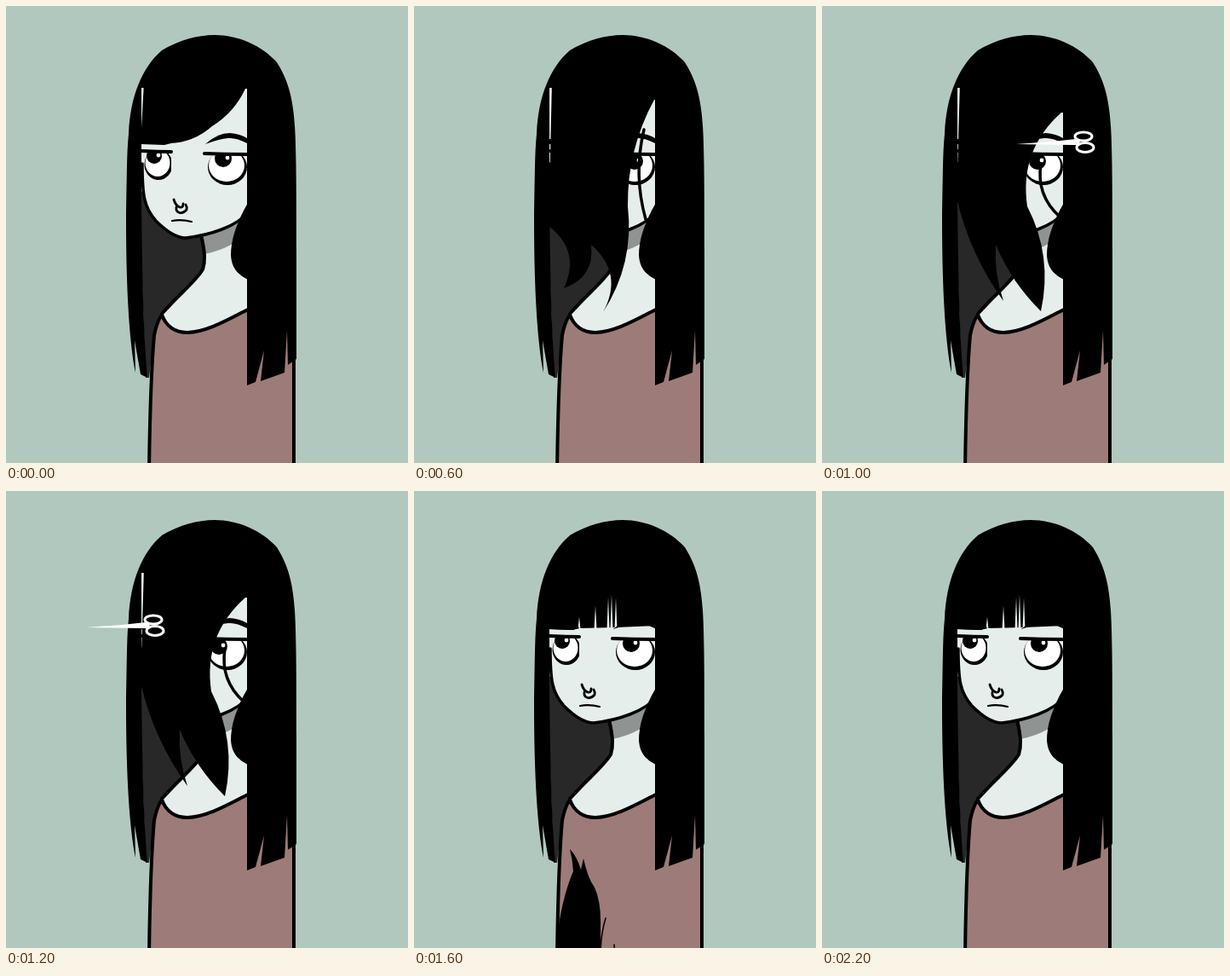
Animation, 472 px wide and 536 px high, one loop 2800 ms. Source, as an HTML page with a canvas:

```html
<!DOCTYPE html>
<html lang="en">
<head>
<meta charset="utf-8">
<title>Cutting bangs</title>
<style>
html, body { margin: 0; width: 100%; height: 100%; overflow: hidden; background: #b1c8be; }
canvas { display: block; width: 472px; height: 536px; }
</style>
</head>
<body>
<canvas id="stage" width="472" height="536"></canvas>
<script>
const ctx = document.getElementById('stage').getContext('2d');
const LOOP = 2800, STEP = 100;
const BG = '#b1c8be', SKIN = '#e6eeec', SHADE = '#8f9392';
const BACK = '#282828', SHIRT = '#9d7b79', INK = '#000', WHITE = '#fff';

const shape = d => new Path2D(d);
function fill(path, color) {
  ctx.fillStyle = color;
  ctx.fill(path);
}
function line(path, width, color = INK) {
  ctx.strokeStyle = color;
  ctx.lineWidth = width;
  ctx.stroke(path);
}
function oval(x, y, rx, ry = rx) {
  const path = new Path2D();
  path.ellipse(x, y, rx, ry, 0, 0, 2 * Math.PI);
  return path;
}

const hair = shape(`M152 430C145 395 141 335 141 250C142 190 142 170 144 150C146 105 160 72 183 52
  C203 40 225 34 245 34C272 34 300 46 318 66C332 88 337 110 339 140C341 170 341 230 341 290
  V414L331 421L330 380L327 430L299 440L303 404L293 441L283 445V96H159V230
  C160 330 162 390 166 436L158 432L151 392Z`);
const sideLock = shape('M284 231C270 255 264 275 264 292C265 310 275 316 284 321Z');
const backHair = shape('M156 215L232 268L236 305L186 362L175 380L168 436H164Z');
const neck = shape('M229 262C234 290 234 300 231 309C222 324 203 338 182 362L195 382H220L290 360V240Z');
const neckLine = shape('M229 268C234 290 234 300 231 309C222 324 203 338 183 361');
const neckShade = shape('M229 270L272 254L266 279Q252 287 233 291Z');
const shirt = shape('M183 362C188 376 199 383 213 383C237 382 262 367 284 356H338V545H168C169 470 171 420 174 386Q177 371 183 362Z');
const face = shape('M159 95V190C160 222 162 236 176 252C188 264 200 272 211 272C238 269 272 259 290 234V95Z');
const jaw = shape('M160 185C160 222 162 236 176 252C188 264 200 272 211 272C238 269 272 259 286 240');
const brows = shape('M234 162Q248 149 263 149Q275 150 283 155V161Q270 154 261 155Q250 156 234 162ZM158 156H191L194 161L186 163L158 162Z');
const nose = shape('M197 227Q199 234 204 236Q208 237 208 232M200 236C199 243 207 245 212 239Q213 236 211 233');
const calm = shape('M195 252Q206 250 218 253');
const frown = shape('M201 256Q206 250 210 256');
const clump = shape(`M183 238Q191 246 196 262L199 249Q204 272 212 283Q220 300 219 330
  C219 355 221 375 226 385C237 400 256 402 257 390L254 378Q266 384 266 400Q266 420 262 432
  C250 448 238 457 226 455C205 452 195 440 187 424C169 400 166 370 168 345C171 310 180 280 187 264Q186 250 183 238Z`);
const looseHairs = shape('M220 378Q217 345 225 319M257 396Q236 378 235 350');

const eyes = [
  { x: 178, y: 184, rx: 14.5, ry: 16, left: 160, right: 194, pupil: 9 },
  { x: 259, y: 187, rx: 21, ry: 19, left: 233, right: 284, pupil: 10 }
];

// Lock corners (root, waist, tip, notch, tip, side), stray hair ends, edge bend, tip curl.
const poses = {
  0: [281, 97, 242, 141, 192, 161, 184, 160, 176, 160, 158, 161, 280, 110, 262, 150, .15, 0],
  4: [281, 125, 254, 212, 212, 273, 192, 279, 174, 275, 158, 256, 277, 152, 235, 267, .04, .1],
  6: [282, 110, 251, 235, 222, 359, 208, 280, 176, 331, 158, 258, 270, 145, 272, 250, -.13, .4],
  10: [281, 125, 241, 235, 257, 358, 204, 280, 213, 346, 158, 225, 257, 185, 279, 247, -.27, -.1]
};

function pose(step) {
  const [a, b] = step < 4 ? [0, 4] : step < 6 ? [4, 6] : [6, 10];
  const k = Math.min(1, (step - a) / (b - a)) ** (a ? 1 : 1.6);
  return poses[a].map((v, i) => v + (poses[b][i] - v) * k);
}

// Curve to (x, y), bowed sideways by a share of its length.
function bow(path, x0, y0, x, y, bend) {
  path.quadraticCurveTo((x0 + x) / 2 + (y - y0) * bend, (y0 + y) / 2 - (x - x0) * bend, x, y);
}

function drawBody() {
  fill(backHair, BACK);
  fill(neck, SKIN);
  fill(neckShade, SHADE);
  line(neckLine, 4);
  fill(shirt, SHIRT);
  line(shirt, 4);
}

function drawEye({ x, y, rx, ry, left, right, pupil }, closed, dx, dy) {
  const lidY = y - 14 + closed * 23;
  if (closed < 1) {
    ctx.save();
    ctx.beginPath();
    ctx.rect(left, lidY, right - left, 60);
    ctx.clip();
    fill(oval(x + 1, y + 2, rx + 2, ry + 2), INK);
    fill(oval(x, y, rx, ry), WHITE);
    fill(oval(x - 4 + dx, y - 8 + dy, pupil), INK);
    fill(oval(x + 1 + dx, y - 9 + dy, 2.4), WHITE);
    ctx.restore();
  } else {
    line(shape(`M${left + 8} ${lidY + 8}Q${x + 6} ${lidY + 9} ${right} ${lidY + 3}`), 1.5);
  }
  line(shape(`M${left} ${lidY}Q${x} ${lidY + 1 + closed * 3} ${right} ${lidY + 1 - closed * 5}`), 4);
}

function drawFace(step) {
  fill(face, SKIN);
  line(jaw, 3.5);
  const closed = { 3: .5, 4: 1, 5: .5, 20: .5, 21: 1 }[step] || 0;
  const peeking = step > 4 && step < 13;
  const dx = peeking ? 4 - (step - 6) * 1.5 : 0;
  for (const eye of eyes) drawEye(eye, closed, dx, peeking ? 3 : 0);
  fill(brows, INK);
  line(nose, 2.8);
  line(step > 12 && step < 16 ? frown : calm, 2.2);
}

function drawLock(step) {
  const p = pose(step), [bend, curl] = p.slice(16);
  if (step > 2) {
    const stray = new Path2D();
    stray.moveTo(p[12], p[13]);
    bow(stray, ...p.slice(12, 16), bend);
    line(stray, 3.5);
  }
  const lock = new Path2D();
  lock.moveTo(162, 90);
  lock.lineTo(284, 90);
  lock.lineTo(284, p[1]);
  lock.lineTo(p[0], p[1]);
  [bend, .18, -curl, curl, -curl].forEach((b, i) => bow(lock, ...p.slice(i * 2, i * 2 + 4), b));
  fill(lock, INK);
}

function drawBangs(step) {
  const sway = Math.max(0, Math.min(1, (16 - step) / 2));
  fill(shape('M158 90H284V158L237 160L193 161L158 162Z'), INK);
  for (const x of [194, 213, 228, 232, 237]) {
    const top = 122 + Math.abs(x - 232) * .68;
    fill(shape(`M${x + 8 * sway} ${top}L${x + 1.5} 162H${x - 1.5}Z`), SKIN);
  }
  fill(shape(`M282 100Q${282 - 4 * sway} 125 ${282 - 17 * sway} 150L282 155Z`), sway ? SKIN : INK);
  fill(brows, INK);
}

function drawClump(step) {
  const n = step - 14;
  ctx.save();
  ctx.translate(0, 55 * n + 18 * n * n);
  fill(clump, INK);
  line(looseHairs, 1.5);
  ctx.restore();
}

function drawScissors(step) {
  const n = step - 10;
  ctx.save();
  ctx.translate(228 - 67 * n, 161 - n);
  fill(shape('M0 1L42 -2L70 -5L75 -3L74 2L66 2Z'), WHITE);
  line(oval(79, -8, 10, 5), 3, WHITE);
  line(oval(81, 5, 10, 5.5), 3, WHITE);
  ctx.restore();
}

function draw(step) {
  ctx.fillStyle = BG;
  ctx.fillRect(0, 0, 472, 536);
  drawBody();
  drawFace(step);
  if (step < 13) drawLock(step);
  else drawBangs(step);
  fill(hair, INK);
  fill(sideLock, INK);
  if (step > 12 && step < 18) drawClump(step);
  if (step > 6 && step < 16) drawScissors(step);
}

ctx.lineCap = ctx.lineJoin = 'round';
let shown = -1;
function tick() {
  const step = Math.floor(performance.now() % LOOP / STEP);
  if (step !== shown) draw(shown = step);
  requestAnimationFrame(tick);
}
tick();
</script>
</body>
</html>
```
